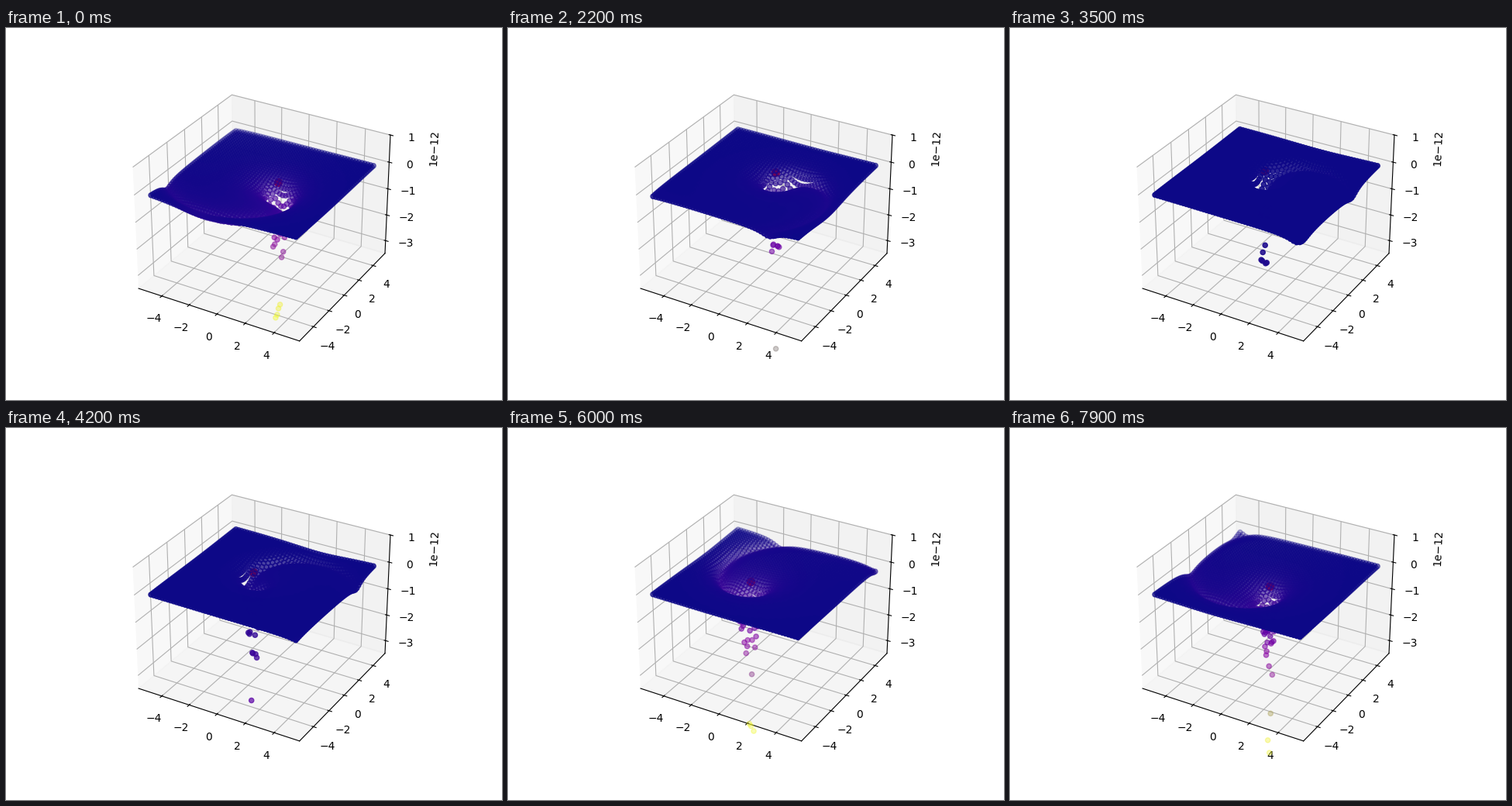
Write a matplotlib script that moves like this. It is 640 px wide and 480 px high and loops after 8000 ms.

```python
import numpy as np
import matplotlib.pyplot as plt
from matplotlib.animation import FuncAnimation
from matplotlib.colors import LinearSegmentedColormap

FRAMES, INTERVAL = 80, 100
STEP = 0.0673        # orbit angle per frame, radians
WAVE_SPEED = 1.5     # in units of the orbital speed
STRENGTH = 0.63e-12

axis = np.linspace(-5, 5, 50)
X, Y = (g.ravel() for g in np.meshgrid(axis, axis))

cmap = LinearSegmentedColormap.from_list("well", [
    (0.00, "#0d0887"), (0.20, "#5c01a6"), (0.38, "#8a0aa5"),
    (0.56, "#96309a"), (0.68, "#827878"), (0.82, "#f0e63c"),
    (1.00, "#f0f921"),
])


def potential(angle):
    """Retarded potential of a mass on the unit circle."""
    lo, hi = np.zeros_like(X), np.full_like(X, 6.0)
    for _ in range(40):
        mid = (lo + hi) / 2
        a = angle - mid
        dist = np.hypot(X - np.cos(a), Y - np.sin(a))
        early = dist > WAVE_SPEED * mid
        lo = np.where(early, mid, lo)
        hi = np.where(early, hi, mid)
    a = angle - (lo + hi) / 2
    dx, dy = X - np.cos(a), Y - np.sin(a)
    toward = (dy * np.cos(a) - dx * np.sin(a)) / WAVE_SPEED
    return -STRENGTH / (np.hypot(dx, dy) - toward)


fig = plt.figure(figsize=(6.4, 4.8), dpi=100)
ax = fig.add_subplot(projection="3d")
half = 5.5 * 25 / 24
ax.set_xlim(-half, half)
ax.set_ylim(-half, half)
ax.set_zlim(-3.5e-12, 1e-12)

dots = []


def draw(i):
    while dots:
        dots.pop().remove()
    angle = STEP * i
    z = potential(angle)
    dots.append(ax.scatter(X, Y, z, c=-z, cmap=cmap))
    dots.append(ax.scatter([np.cos(angle)], [np.sin(angle)], [0],
                           color="red", s=50))
    return dots


anim = FuncAnimation(fig, draw, frames=FRAMES, interval=INTERVAL,
                     init_func=lambda: draw(0), repeat=True)
plt.show()
```
